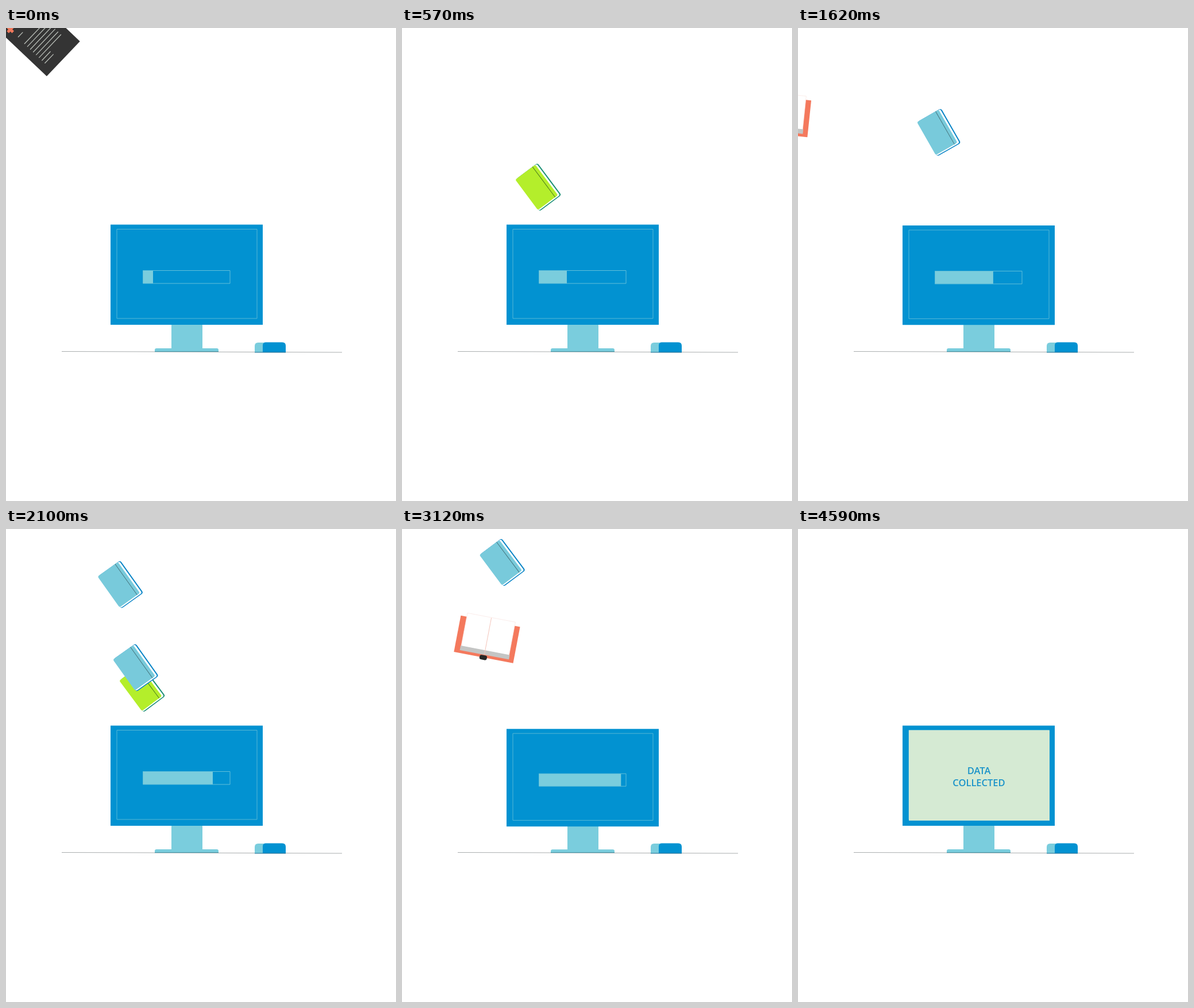
Animation, 679 px wide and 824 px high, one loop 4680 ms. Source, as an HTML page:

```html
<!DOCTYPE html>
<html lang="en">
<head>
<meta charset="utf-8">
<title>Data collected</title>
<style>
  html, body { margin: 0; width: 100%; height: 100%; overflow: hidden; background: #fff; }
  svg { display: block; width: 679px; height: 824px; }
  text { font: 600 16.5px "Open Sans", "Noto Sans", sans-serif; fill: #1a93c9; text-anchor: middle; }
</style>
</head>
<body>
<svg viewBox="0 0 679 824">
  <defs>
    <g id="doc">
      <path fill="#343434" d="M-42-59h84V59h-84z"/>
      <path stroke="#f2795c" stroke-width="5" d="M-33-43h13M-26.5-49.5v13"/>
      <path stroke="#b9beb8" stroke-width="1.3" d="M-27-24h12M-28-8h56M-28-1h56M-28 6h56M-28 13h56M-28 20h56M-28 27h56M-28 34h22M-28 41h22"/>
    </g>
    <g id="blue">
      <rect x="-23" y="-34.5" width="47.5" height="69.5" rx="4" fill="#0a85c7"/>
      <rect x="-23" y="-34" width="45.5" height="67.5" rx="3" fill="#fff"/>
      <rect x="-24" y="-34.5" width="43.5" height="66" rx="3" fill="#78cadb"/>
      <path stroke="#47767f" d="M13.5-34.5v66"/>
    </g>
    <g id="green">
      <rect x="-23" y="-34.5" width="47.5" height="69.5" rx="4" fill="#1b8f76"/>
      <rect x="-23" y="-34" width="45.5" height="67.5" rx="3" fill="#fff"/>
      <rect x="-24" y="-34.5" width="43.5" height="66" rx="3" fill="#b4ee2b"/>
      <path stroke="#4a7a20" d="M13.5-34.5v66"/>
    </g>
    <g id="red">
      <path fill="#f4795d" d="M-52.5-32h105v64.5h-105z"/>
      <path fill="#fff" stroke="#f8e2de" stroke-width=".6" d="M-42-38.5h85v59h-85z"/>
      <path fill="#c4c5c4" d="M-43 19.500h87v8h-87z"/>
      <path stroke="#f3c4ba" d="M.5-38v65"/>
      <rect x="-7" y="28.500" width="13" height="8" rx="3" fill="#262626"/>
    </g>
    <g id="env">
      <path fill="#dcc62e" d="M-30.500-19h61v38h-61z"/>
      <path fill="none" stroke="#ede48a" stroke-width="1.2" d="M-30-18.500L.5 1 30-18.500"/>
    </g>
  </defs>

  <g id="items"></g>
  <path stroke="#a9adae" d="M97 563.500L585 565"/>

  <g id="monitor">
    <path fill="#7acddd" d="M288 516h54v42h25q3 0 3 3v3H259v-3q0-3 3-3h26z"/>
    <path stroke="#3f8fa0" d="M259 563.700h111"/>
    <path fill="#0292d1" d="M182 342.500h265V517H182z"/>
    <path id="frame" fill="none" stroke="#57b7d6" d="M193 350.500h244V506H193z"/>
    <g id="bar">
      <rect id="fill" x="238" y="422.500" height="22.500" fill="#7acddd"/>
      <path fill="none" stroke="#62bfd9" d="M238.500 422.500h151.500v22.500H238.500z"/>
    </g>
    <path id="screen" fill="#d5ead3" d="M193 350.500h245V508H193z"/>
    <g id="label">
      <text x="315" y="427">DATA</text>
      <text x="315" y="448">COLLECTED</text>
    </g>
  </g>

  <path fill="#7acddd" d="M433 565v-11q0-6 6-6h21v17z"/>
  <path fill="#0292d1" d="M447 565v-12q0-5.500 5.500-5.500h28.500q6 0 6 6V565z"/>
  <path stroke="#17688f" d="M433 565h54"/>
</svg>
<script>
const LOOP = 4680, TICK = 30, SEG = 60;
const $ = id => document.getElementById(id);

// Flight paths: x, y, angle at every SEG ms.
const paths = {
  doc: [[-35, -75, -47], [57, 13, -46.5], [140, 105, -42], [215, 205, -34], [270, 300, -22], [300, 405, -10]],
  blue: [[100, -55, -40], [150, 20, -38], [199, 97, -35.5], [245, 182, -29.8], [278, 263, -23], [296, 333, -15], [305, 405, -6]],
  green: [[120, -50, -36], [165, 60, -34], [203, 170, -33], [237, 277.5, -36.7], [258, 345, -30], [275, 400, -22], [285, 430, -15]],
  red: [[-75, 150, 5], [10, 155, 7], [105, 175, 9], [191, 209, 12.6], [245, 265, 16], [285, 335, 19], [300, 410, 22]],
  env: [[-40, 236, 4], [38.5, 243, 6.6], [136.7, 268.5, 11.3], [220, 318, 17], [300, 395, 24]]
};

// Shape, start time, optional path of another shape.
const flights = [
  ['doc', -60], ['env', 60], ['blue', 150], ['green', 390], ['blue', 600],
  ['doc', 690], ['env', 840], ['red', 990], ['blue', 990], ['doc', 1170],
  ['green', 1230], ['env', 1350], ['blue', 1440], ['red', 1590], ['doc', 1680],
  ['green', 1920], ['blue', 1940, 'green'], ['blue', 1980], ['doc', 2160],
  ['red', 2250], ['blue', 2370], ['env', 2550], ['green', 2700], ['doc', 2760],
  ['env', 2880], ['red', 2970], ['blue', 3030], ['doc', 3150], ['green', 3240],
  ['blue', 3360], ['env', 3540]
].map(([shape, start, route = shape]) => {
  const el = document.createElementNS('http://www.w3.org/2000/svg', 'use');
  el.setAttribute('href', '#' + shape);
  $('items').append(el);
  const path = paths[route];
  return { el, start, path, dur: (path.length - 1) * SEG };
});

const progress = [[0, 18], [570, 49], [1170, 83], [2100, 122], [2670, 137], [3600, 150], [3780, 152], [LOOP, 152]];

const clamp = v => Math.max(0, Math.min(1, v));
const mix = (a, b, k) => a + (b - a) * k;
const ramp = (t, from, to) => clamp((t - from) / (to - from));

function barWidth(t) {
  const i = progress.findIndex(p => p[0] > t);
  const [t0, w0] = progress[i - 1], [t1, w1] = progress[i];
  return mix(w0, w1, (t - t0) / (t1 - t0));
}

function place({ el, start, path, dur }, t) {
  const age = t - start, on = age >= 0 && age < dur;
  el.style.display = on ? '' : 'none';
  if (!on) return;
  const i = Math.floor(age / SEG), k = age / SEG - i;
  const [x, y, a] = path[i].map((v, n) => mix(v, path[i + 1][n], k));
  el.setAttribute('transform', `translate(${x} ${y}) rotate(${a})`);
}

// The monitor dips as each item drops in.
function dip(t) {
  return Math.max(...flights.map(f => Math.sin(Math.PI * ramp(t, f.start + f.dur - 160, f.start + f.dur + 40))));
}

function draw(t) {
  flights.forEach(f => place(f, t));
  const s = 1 - 0.045 * dip(t);
  $('monitor').setAttribute('transform', `translate(0 ${563.5 * (1 - s)}) scale(1 ${s})`);
  $('fill').setAttribute('width', barWidth(t));
  $('bar').style.opacity = 1 - ramp(t, 3840, 3960);
  $('screen').style.opacity = ramp(t, 3900, 4080);
  $('label').style.opacity = ramp(t, 4050, 4230);
}

const begin = performance.now();
function loop(now) {
  const t = Math.max(0, now - begin) % LOOP;
  draw(Math.min(4590, Math.floor(t / TICK) * TICK));
  requestAnimationFrame(loop);
}
draw(0);
requestAnimationFrame(loop);
</script>
</body>
</html>
```
